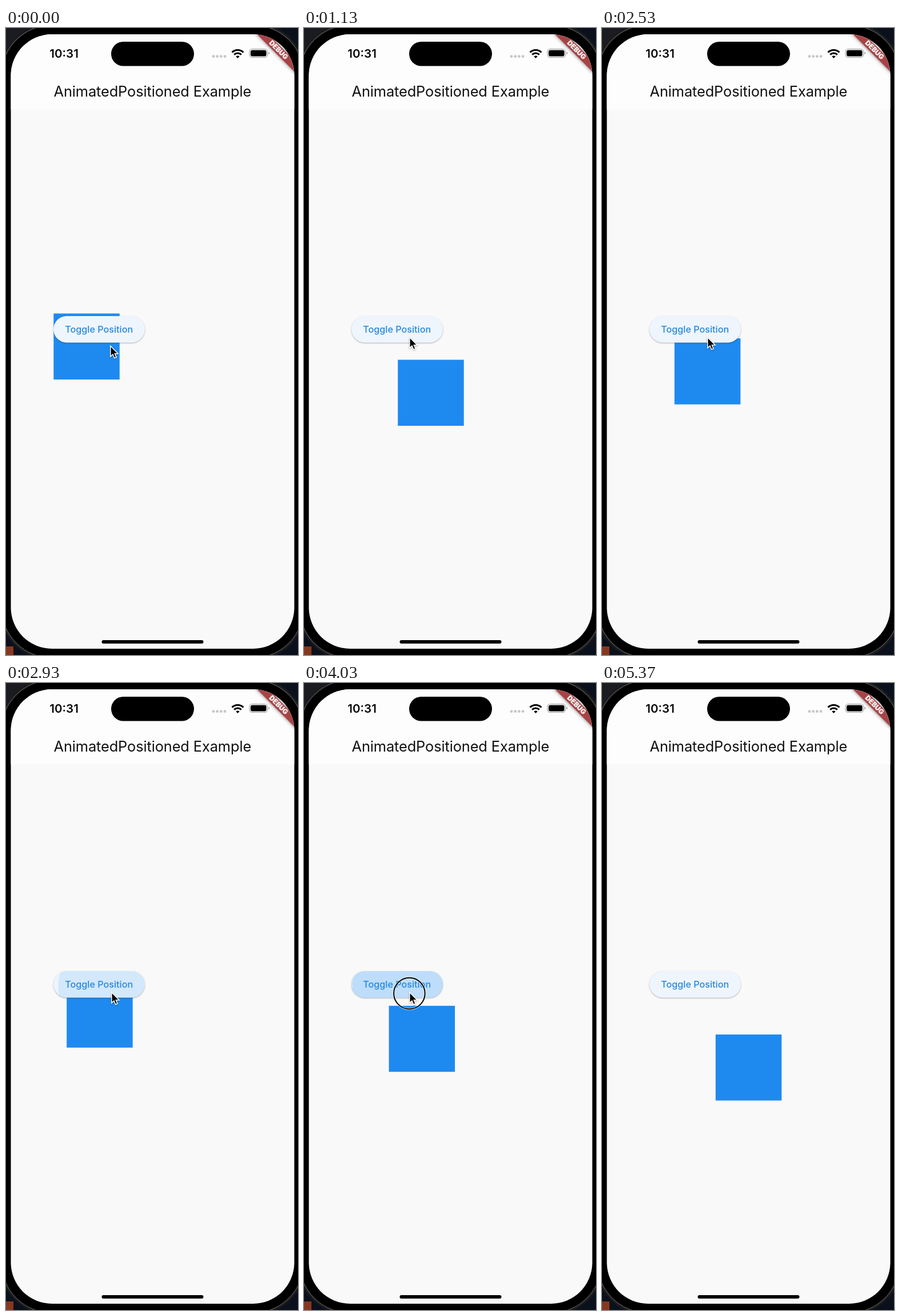
An HTML page that plays this animation: 511x1097 px, repeating every 5.41 s.

```html
<!DOCTYPE html>
<html lang="en">
<head>
<meta charset="utf-8">
<title>AnimatedPositioned Example</title>
<style>
  html, body { margin: 0; width: 100%; height: 100%; overflow: hidden; background: #000; }
  svg { display: block; width: 511px; height: 1097px; font-family: Inter, "Liberation Sans", sans-serif; }
  .button { filter: drop-shadow(0 1.2px 1px rgba(0, 0, 0, .3)); }
  .banner { filter: drop-shadow(0 0 3px rgba(0, 0, 0, .5)); }
  .cursor { filter: drop-shadow(0 1px 1px rgba(0, 0, 0, .35)); }
</style>
</head>
<body>
<svg viewBox="0 0 511 1097">
  <defs>
    <clipPath id="screen"><rect x="8.5" y="11" width="496" height="1075" rx="72"/></clipPath>
    <clipPath id="pill"><rect x="83" y="504" width="160" height="46.4" rx="23.2"/></clipPath>
  </defs>

  <!-- desktop corners and phone body -->
  <rect width="511" height="1097" fill="#0b111c"/>
  <rect width="40" height="40" fill="#1b1c21"/>
  <rect y="1082" width="13" height="15" fill="#87391f"/>
  <rect x="-10" y="-7" width="533" height="1111" rx="91" fill="#000" stroke="#1a1a1c" stroke-width="5"/>
  <rect x="-8" y="-5" width="529" height="1107" rx="88" fill="#000" stroke="#4b4b4e" stroke-width="1.6"/>

  <g clip-path="url(#screen)">
    <rect width="511" height="1097" fill="#f9f9f9"/>
    <rect width="511" height="142.5" fill="#fdfdfd"/>
    <text x="256.3" y="120" text-anchor="middle" font-size="25.4" letter-spacing="-.12" fill="#101010">AnimatedPositioned Example</text>

    <rect id="square" x="83.3" y="499.5" width="115.5" height="115.5" fill="#1e8af0"/>

    <rect class="button" x="83" y="504" width="160" height="46.4" rx="23.2" fill="#eff5fc"/>
    <g clip-path="url(#pill)" fill="#2196f3">
      <rect id="highlight" x="83" y="504" width="160" height="47"/>
      <g id="ripples"></g>
    </g>
    <text x="162.7" y="533.2" text-anchor="middle" font-size="16.2" font-weight="500" fill="#2588dc">Toggle Position</text>

    <g class="banner" transform="translate(504.5 11) rotate(45)">
      <rect x="-50" y="32.3" width="100" height="13.9" fill="#a84345"/>
      <text y="43.5" text-anchor="middle" font-size="11.8" font-weight="900" fill="#fff">DEBUG</text>
    </g>
  </g>

  <!-- status bar -->
  <text x="101.6" y="51.8" text-anchor="middle" font-size="20.5" font-weight="600" fill="#080808">10:31</text>
  <rect x="184" y="24" width="145" height="42.5" rx="21.2"/>
  <g fill="#c6c6c6">
    <circle cx="363" cy="49.7" r="2.4"/><circle cx="369.7" cy="49.7" r="2.4"/>
    <circle cx="376.4" cy="49.7" r="2.4"/><circle cx="383.1" cy="49.7" r="2.4"/>
  </g>
  <g fill="none" stroke="#000" stroke-width="3.2">
    <path d="M395.6 42.6a14 14 0 0 1 19.8 0"/>
    <path d="M399.3 46.6a8.7 8.7 0 0 1 12.4 0"/>
  </g>
  <path d="M405.5 52.9l-3.1-3.2a4.4 4.4 0 0 1 6.2 0z"/>
  <rect x="426.1" y="36.8" width="31.4" height="14.6" rx="4.6" fill="none" stroke="#a2a2a2" stroke-width="1.2"/>
  <rect x="428" y="38.7" width="27.6" height="10.8" rx="3"/>
  <path d="M459.3 41.6q2 .8 2 2.5t-2 2.5z" fill="#a2a2a2"/>
  <rect x="167.5" y="1071" width="178" height="6" rx="3"/>

  <g id="pointer">
    <g id="ring" fill="none">
      <circle cx="-.4" cy="1.8" r="27.3" stroke="#fff" stroke-width="3.6" opacity=".75"/>
      <circle cx="-.4" cy="1.8" r="27.3" stroke="#000" stroke-width="2"/>
    </g>
    <path class="cursor" d="M0 0V18.6L4.2 14.7 6.9 21.2 10.3 19.8 7.6 13.4H13.3Z" stroke="#fff" stroke-width="1.5"/>
  </g>
</svg>
<script>
  const LOOP = 5410, TRAVEL = 115.5, MOVE = 1000, CURSOR_GONE = 5130;
  // [down, up] time of each press
  const presses = [[295, 430], [1770, 1908], [2680, 2815], [3540, 3677], [3730, 4130]];
  const $ = id => document.getElementById(id);
  const clamp = x => Math.min(1, Math.max(0, x));
  const lerp = (a, b, k) => a + (b - a) * k;
  const ease = x => 1 - (1 - clamp(x)) ** 2.3;
  const set = (el, attrs) => { for (const k in attrs) el.setAttribute(k, attrs[k]); };

  const ripples = presses.map(() =>
    $('ripples').appendChild(document.createElementNS('http://www.w3.org/2000/svg', 'circle')));

  // Every release starts a new linear leg from wherever the square is.
  function offset(t) {
    let from = 0, target = 0, start = 0;
    const at = time => lerp(from, target, clamp((time - start) / MOVE));
    for (const [, up] of presses) {
      if (t < up) break;
      from = at(up);
      target = TRAVEL - target;
      start = up;
    }
    return at(t);
  }

  function draw(t) {
    const d = offset(t);
    set($('square'), { transform: `translate(${d} ${d})` });

    let glow = 0;
    presses.forEach(([down, up], i) => {
      const grow = ease((t - down) / 500);
      const fade = clamp((t - down) / 75) * (1 - clamp((t - up - 225) / 150));
      set(ripples[i], {
        cx: lerp(185, 162.5, grow), cy: lerp(542, 527, grow),
        r: 88 * lerp(.3, 1, grow), opacity: .12 * fade
      });
      glow = Math.max(glow, clamp((Math.min(t, up) - down) / 200) - clamp((t - up) / 200));
    });
    set($('highlight'), { opacity: .12 * glow });

    const k = ease((t - 30) / 240);
    set($('pointer'), {
      transform: `translate(${lerp(182.8, 184.8, k)} ${lerp(556.3, 541.3, k)})`,
      visibility: t < CURSOR_GONE ? 'visible' : 'hidden'
    });
    set($('ring'), { opacity: presses.some(([down, up]) => t >= down && t < up) ? 1 : 0 });
  }

  const begin = performance.now();
  function tick() {
    draw((performance.now() - begin) % LOOP);
    requestAnimationFrame(tick);
  }
  tick();
</script>
</body>
</html>
```
